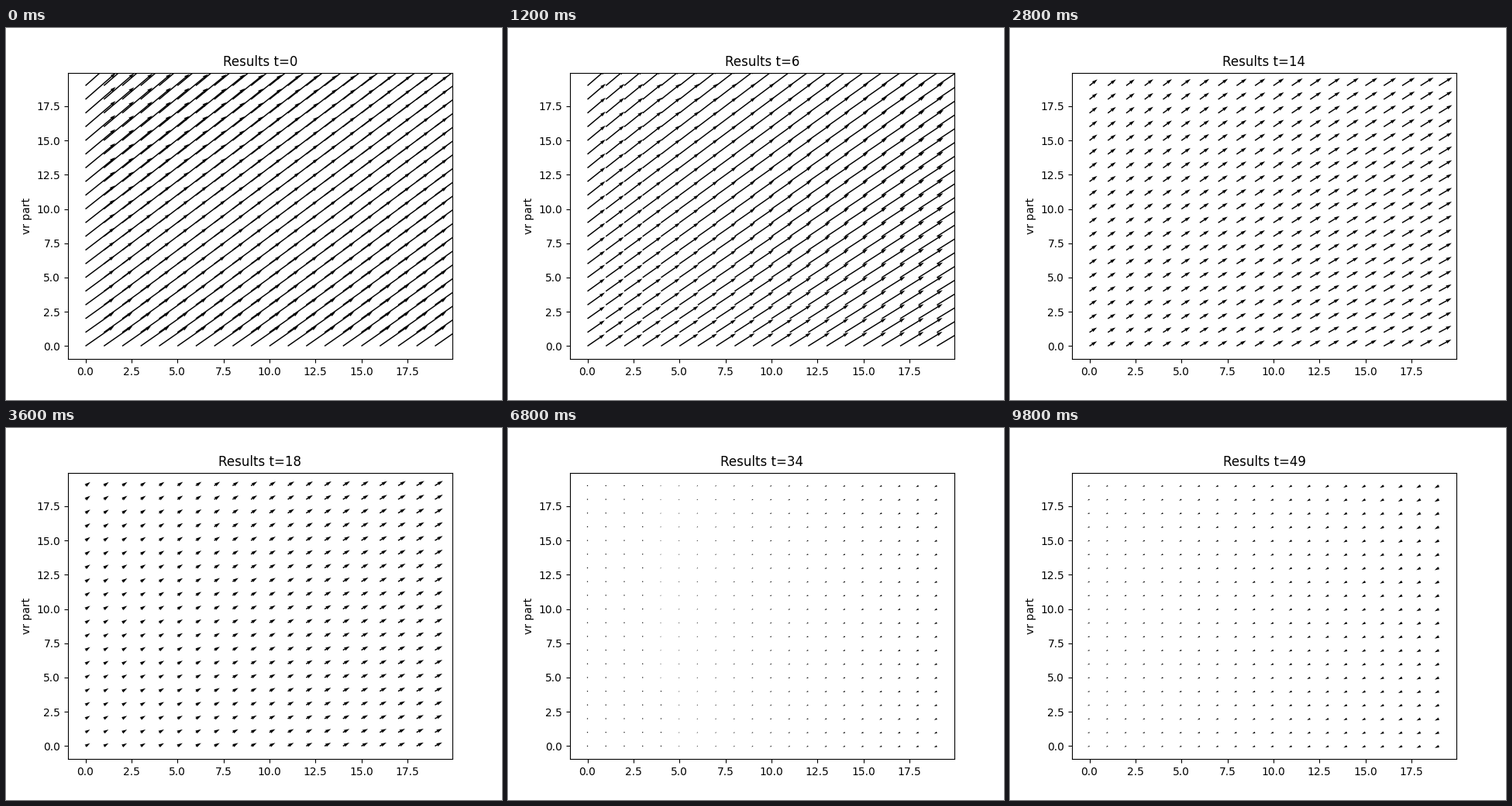
Write a matplotlib script that moves like this. It is 640 by 480 pixels and loops after 10 s.

```python
import numpy as np
import matplotlib.pyplot as plt
from matplotlib.animation import FuncAnimation

FRAMES, STEP_MS, N = 50, 200, 20

x, y = np.meshgrid(np.arange(N), np.arange(N))
fx, fy = x / (N - 1), y / (N - 1)


def decay(t, tau, power=1):
    return np.exp(-(t / tau) ** power)


def mix(a, b, w):
    return a + (b - a) * w


def field(t):
    """Arrow components in pixels at step t."""
    # The flow fades and turns back, later on the right than on the left.
    left = -2.88 + 41 * decay(t, 12.2, 1.09)
    right = -5.7 + 45.2 * decay(t, 17.27, 1.65)
    u = mix(left, right, fx ** (1 + t / 150))
    u = u * (1 + 0.06 * (fy - 0.5))
    u = u + 0.75 * decay(abs(t - 26), 10, 2) * (fy - 0.5) * fx**2

    # Steepness flattens from the top left to the bottom right.
    slow, fast = decay(t, 25, 2), decay(t, 12)
    left_slope = mix(0.48 + 0.215 * slow, 0.53 + 0.355 * slow, fy)
    right_slope = mix(0.45 + 0.245 * fast, 0.56 + 0.19 * fast, fy)
    return u, u * mix(left_slope, right_slope, fx**0.7)


fig, ax = plt.subplots(figsize=(6.4, 4.8), dpi=100)
arrows = ax.quiver(x, y, *field(0), scale=1, scale_units="dots")
ax.set_xlim(-0.95, 19.95)
ax.set_ylim(-0.95, 19.95)
ax.set_ylabel("vr part")
title = ax.set_title("Results t=0")


def update(t):
    arrows.set_UVC(*field(t))
    title.set_text(f"Results t={t}")
    return arrows, title


anim = FuncAnimation(fig, update, frames=FRAMES, interval=STEP_MS,
                     init_func=lambda: update(0), repeat=True, blit=False)
plt.show()
```
